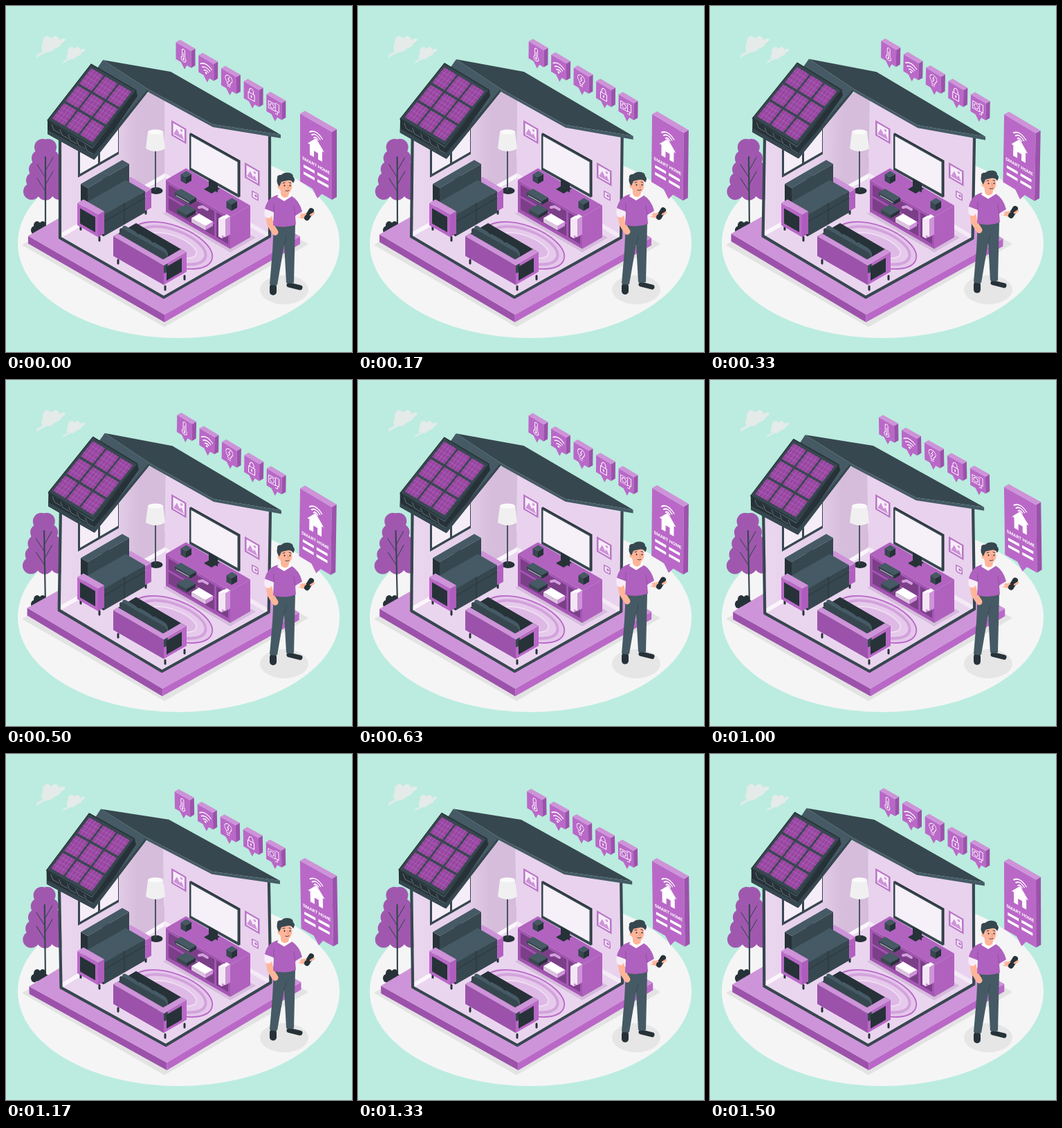
An HTML page that plays this animation: 500x500 px, repeating every 1.54 s.

```html
<!DOCTYPE html>
<html lang="en">
<head>
<meta charset="utf-8">
<title>Smart home</title>
<style>
html, body { margin: 0; width: 100%; height: 100%; overflow: hidden; background: #bbecdf; }
svg { display: block; width: 100vw; height: 100vh; }
text { font: 700 6.2px Roboto, sans-serif; text-anchor: middle; fill: #fff; }
</style>
</head>
<body>
<svg id="stage" viewBox="0 0 500 500"></svg>
<script>
const DARK = '#263238', SLATE = '#37474f', STEEL = '#455a64';
const LIGHT = '#ce93d8', PURPLE = '#ba68c8', DEEP = '#9c52ab', SHADE = '#7b3f88';
const SKIN = '#ffb59a', WHITE = '#fff', ISO = 0.577;

const repeat = (n, fn) => Array.from({ length: n }, (_, i) => fn(i)).join('');
const group = (id, ...parts) => `<g id="${id}">${parts.join('')}</g>`;
const placed = (transform, ...parts) => `<g transform="${transform}">${parts.join('')}</g>`;
const poly = (fill, points) => `<polygon fill="${fill}" points="${points}"/>`;
const path = (fill, d) => `<path fill="${fill}" d="${d}"/>`;
const line = (color, width, d) =>
  `<path fill="none" stroke="${color}" stroke-width="${width}" stroke-linecap="round" stroke-linejoin="round" d="${d}"/>`;
const oval = (fill, x, y, rx, ry = rx, extra = '') =>
  `<ellipse fill="${fill}" cx="${x}" cy="${y}" rx="${rx}" ry="${ry}" ${extra}/>`;
const rect = (fill, x, y, w, h, r = 0) =>
  `<rect fill="${fill}" x="${x}" y="${y}" width="${w}" height="${h}" rx="${r}"/>`;

// Isometric parts: drawing on a wall, one upright face, one flat tile, one block.
const onWall = (x, y, slope, ...parts) => placed(`matrix(1 ${slope} 0 1 ${x} ${y})`, ...parts);
const face = (fill, x, y, w, h, slope = ISO, r = 0) => onWall(x, y, slope, rect(fill, 0, 0, w, h, r));
const tile = (fill, x, y, l, r) => poly(fill,
  [x, y, x - l, y - l * ISO, x - l + r, y - (l + r) * ISO, x + r, y - r * ISO]);
const box = (x, y, l, r, h, top, left, right) =>
  face(left, x - l, y - h - l * ISO, l, h) + face(right, x, y - h, r, h, -ISO) + tile(top, x, y - h, l, r);
const darkBox = (x, y, l, r, h) => box(x, y, l, r, h, STEEL, SLATE, DARK);
const cushion = (x, y, l, r, h) => box(x, y, l, r, h, STEEL, DARK, SLATE);

const cloud = path('#e4ebe9',
  'M43 75L45 70L53 66Q49 61 53 56Q52 47 57 44Q62 42 65 47Q71 41 75 45L77 49Q84 45 86 48Q86 51 80 54Q78 60 71 61Q67 67 58 67Z');
const clouds = cloud + placed('translate(49 26) scale(.76)', cloud);

const ground = oval('#f5f5f5', 249.5, 343, 232.5, 137) +
  tile('#e3e3e3', 229, 464, 206, 208) + oval('#e6e6e6', 402, 410, 35, 21);

const tree = group('tree',
  oval('#a058af', 57, 240, 20, 41),
  repeat(10, i => {
    const row = i >> 1, side = i % 2 ? 1 : -1;
    return oval('#a058af', 57 + side * (4 + row * 4), 204 + row * 16, 12);
  }),
  repeat(4, i => line(SLATE, 1, `M57 ${268 - i * 10}l${i % 2 ? 11 : -12} -19`)),
  line(SLATE, 2.2, 'M57 325V218')) +
  repeat(5, i => oval(DARK, 41 + i * 4, 324 - i % 2 * 7, 5, 6));

const shellBack =
  box(229, 457, 197, 196, 11, '#ce94d9', DEEP, PURPLE) +
  face('url(#wall)', 80, 198, 149, 137, -ISO) +
  poly('#e9d2ee', '229,130 298,171 381,189 381,333 229,247') +
  tile('#ead5ef', 229, 421, 149, 152) +
  face('#faf5fb', 80, 328, 149, 7, -ISO) + face('#f4eaf6', 229, 241, 152, 7);

const CELL = 0.275;
const solarCell = i => {
  const x = 0.05 + i % 3 * 0.31, y = 0.05 + Math.floor(i / 3) * 0.31;
  return rect('#97469f', x, y, CELL, CELL) + repeat(3, k => {
    const d = (k + 1) * CELL / 4;
    return line('#b065be', 0.008, `M${x + d} ${y}v${CELL}M${x} ${y + d}h${CELL}`);
  });
};
const solarPanel = placed('matrix(65 38 -63 81 123 84)',
  rect(SLATE, 0, 0, 1, 1), repeat(9, solarCell), line(DARK, 0.015, 'M0 0H1V1H0Z'));

const shellFront =
  line(SLATE, 4.2, 'M78 190V335L228 421L381 333V188') +
  poly(SLATE, '140,78 238,95 397,186 299,171 205,120') +
  poly(STEEL, '205,120 299,171 397,186 397,191 299,175 205,124') +
  poly(STEEL, '140,78 205,120 205,124 128,222 70,180') +
  poly(DARK, '60,165 125,206 188,122 190,130 127,222 60,185') +
  poly(SLATE, '60,179 126,215 205,120 205,124 127,222 60,185') +
  repeat(5, i => line('#7d8b91', 0.7, `M${66 + i * 12} ${171 + i * 7.5}l3 8l9 5`)) +
  solarPanel;

const windowPanes = face(SLATE, 104, 178, 59, 70, -ISO) +
  repeat(2, i => face('#f5edf7', 107 + i * 29, 179.5 - i * 16.7, 26, 63, -ISO));

const lamp = oval(DARK, 217, 267, 9.5, 5) + line(SLATE, 1.8, 'M216 205V266') +
  path('#f1f0f1', 'M205 182L202 206Q216 214 230 206L227 182Z') + oval('#fafafa', 216, 182, 11, 3.5);

const picture = (x, y) => onWall(x, y, ISO,
  rect('#b877c6', 0, 0, 21.5, 22), rect('#f6edf8', 2.5, 2.5, 16.5, 17),
  poly(LIGHT, '3,18 8,8 12,14 14.5,11 18.5,18'), oval(LIGHT, 14.5, 6.5, 1.7));

const tv = face(DARK, 266.5, 183, 72, 53, 0.56) + face(SLATE, 265, 184, 72, 53, 0.56) +
  face('#f6f0f8', 267.5, 188, 67, 46, 0.56);

const thermostat = onWall(355, 266, ISO,
  rect('#b877c6', 0, 0, 10, 10.5, 2), rect('#f0def3', 1.5, 1.5, 7, 7.5, 1), oval(PURPLE, 6, 5, 1.6));

const ring = (fill, rx, stroke, width) =>
  oval(fill, 240, 346, rx, rx * 0.6 - 8, `stroke="${stroke}" stroke-width="${width}"`);
const rug = placed('rotate(20 240 346)',
  ring('#e4c6ea', 61, PURPLE, 1.8), ring('#e6caeb', 51, '#d3a3dc', 4), ring('#dfb9e6', 37, '#f2e4f5', 1.5));

const cabinet =
  tile('#d6bcdc', 324, 356, 97, 37) +
  box(324, 351, 93, 29, 46, '#b163bf', '#a456b3', '#b061be') +
  onWall(231, 251, ISO, rect(SHADE, 4, 5, 66, 16), rect(SHADE, 4, 24, 66, 17), rect(SHADE, 73, 5, 17, 36)) +
  darkBox(266, 287, 22, 9, 5) + line(WHITE, 0.8, 'M246 274l18 10') +
  line('#d59ede', 4, 'M279 291l5 -1l7 4') +
  darkBox(261, 307, 14, 13, 5) + box(288, 324, 20, 11, 6, WHITE, '#dcc4e1', LIGHT) +
  repeat(2, i => box(312 + i * 5, 336 - i * 2, 5, 7, 26, WHITE, '#f4e6f6', LIGHT)) +
  darkBox(260, 257, 7.5, 8, 9.5) + darkBox(326, 296, 7.5, 8, 9.5) +
  tile(DARK, 297, 271, 11, 12) + face(DARK, 293, 249, 13, 13);

const legs = (...spots) => spots.map(([x, y]) => line(DARK, 3, `M${x} ${y - 6}v5`)).join('');

const backSofa =
  legs([108, 324], [135, 340], [202, 301]) +
  box(202, 296, 30, 8, 27, LIGHT, PURPLE, '#b160bf') +
  tile('#f0e6f2', 196, 279, 12, 6) +
  cushion(149, 274, 10, 29, 29) + cushion(118, 290, 10, 31, 27) +
  cushion(141, 333, 30, 60, 22) +
  cushion(171, 295, 28, 30, 10) + cushion(141, 312, 28, 30, 10) +
  line(DARK, 0.8, 'M141 312l60 -35M171 285v30') +
  box(133, 334, 30, 9, 32, LIGHT, PURPLE, '#ad5dbb') +
  onWall(103, 285, ISO, rect(DARK, 4, 5, 22, 22));

const frontSofa =
  legs([162, 373], [230, 411], [258, 396]) +
  box(228, 403, 73, 33, 28, DARK, DEEP, PURPLE) +
  repeat(3, i => {
    const x = 164 + i * 21, y = 317 + i * 12;
    return face(STEEL, x + 4, y - 2, 24, 32, ISO, 6) + face(SLATE, x, y + 2, 26, 30, ISO, 5) +
      line(DARK, 0.8, `M${x + 26} ${y + 20}v22`);
  }) +
  face(DEEP, 155, 333, 73, 28) + tile(LIGHT, 228, 375, 73, 7) + tile(LIGHT, 228, 375, 8, 33) +
  onWall(228, 375, -ISO, rect(DARK, 4, 4, 22, 20));

const glyphs = [
  line(WHITE, 0.9, 'M-2 3V-7Q0 -10 2 -7V3A3.5 3.5 0 1 1 -2 3M0 -3V5') + oval(WHITE, 0, 6, 1.3),
  line(WHITE, 1.4, 'M-8 -2Q0 -9 8 -2M-5.5 1.500Q0 -3 5.5 1.5M-3 4.5Q0 2 3 4.5') + oval(WHITE, 0, 7, 1.4),
  line(WHITE, 0.9, 'M-2 5Q-2 2 -4 0A5 5 0 1 1 4 0Q2 2 2 5ZM-2 7.5H2M1 -6L-1 -2H1L-1 2'),
  line(WHITE, 1, 'M-4.5 -1H4.5V8H-4.5ZM-3 -1V-5Q0 -11 3 -5V-1M0 3V5') + oval(WHITE, 0, 3, 1.1),
  line(WHITE, 0.9, 'M-8 -5H2V5H-8ZM2 -7H7V4H2M5 4V8H2M-6 0A3 3 0 1 0 0 0A3 3 0 1 0 -6 0')
];
const bubbles = repeat(glyphs.length, i => placed(`translate(${245.5 + i * 32.7} ${50.5 + i * 18.8})`,
  box(22, 39, 22, 6, 24.5, LIGHT, PURPLE, DEEP), poly(PURPLE, '7,30 16,35 12.5,41'),
  onWall(11, 20.5, 0.56, glyphs[i])));

const sign = box(471, 280, 46, 7, 98, LIGHT, PURPLE, DEEP) + poly(PURPLE, '442,262 457,271 450,278') +
  onWall(448, 205, 0.56,
    path(WHITE, 'M0 -14L12 0H9V15H3V6H-3V15H-9V0H-12Z'),
    repeat(3, i => line(WHITE, 1.7, `M${i * 3 - 9} ${i * 2.5 - 18}q${9 - i * 3} ${i * 2.5 - 9} ${18 - i * 6} 0`)),
    '<text y="27.500">SMART HOME</text>',
    repeat(4, i => rect(WHITE, i % 2 * 20 - 18, 34 + (i >> 1) * 10, 16, 4)));

const man = group('man',
  line(DARK, 10, 'M386 406V413'), line(DARK, 7, 'M409 403L425 407'),
  path(STEEL, 'M387 315H418L416 400Q410 402 405 400L402 345L392 403Q387 405 381 402L385 355Z'),
  line(SLATE, 0.8, 'M402 345L405 333'),
  line(SKIN, 9, 'M379 300L382 316L389 327'), line(SKIN, 7, 'M422 302L431 304L442 299'),
  line('#f7edf9', 11, 'M379 296V301M421 298L422 300'),
  path('#ae61be', 'M393 273Q378 276 374 293L387 298L386 317Q402 322 419 316L418 303L428 297Q424 281 412 274Z'),
  line('#8f4a9e', 0.8, 'M387 298V286M418 303L416 290'),
  poly(WHITE, '395,270 392,276 402,282 413,275 410,270'),
  line(SKIN, 12, 'M403 265V271'),
  oval(SKIN, 404, 260, 9.5, 11.5), oval(SKIN, 395, 261, 2.5, 3.2),
  path(SLATE, 'M395 261Q390 255 392 249Q391 244 398 244Q402 240 409 241Q415 242 415 247Q419 250 415 256Q412 251 407 252L398 254Z'),
  line(DARK, 0.9, 'M400 256L403 255.5M409 255L412 256M404 267Q407 268 409 266.5'),
  line('#e58468', 0.8, 'M407 259L408.5 263L406.5 263.5'),
  repeat(2, i => oval(DARK, 402.5 + i * 8, 259.5, 0.9, 1.2)),
  line(DARK, 8, 'M441 296L435 306'), line(SKIN, 2.4, 'M440 302L445 299M426 302L433 301'));

document.getElementById('stage').innerHTML =
  `<linearGradient id="wall"><stop stop-color="#ead6ee"/><stop offset=".5" stop-color="#e6d0eb"/>
    <stop offset=".75" stop-color="#d6bddb"/></linearGradient>` +
  clouds + ground + tree + group('shellBack', shellBack) +
  windowPanes + lamp + picture(239, 165) + picture(345, 226) + thermostat + tv +
  rug + cabinet + backSofa + frontSofa +
  group('shellFront', shellFront) + group('signs', bubbles, sign) + man;

const LOOP = 1540;
const move = (id, transform) => document.getElementById(id).setAttribute('transform', transform);

function draw() {
  const phase = performance.now() % LOOP / LOOP;
  const sway = Math.sin(phase * 2 * Math.PI);
  const lift = Math.sin(phase * Math.PI) ** 2;
  for (const id of ['shellBack', 'shellFront']) move(id, `rotate(${sway} 229 250)`);
  move('signs', `rotate(${sway} 361 163)`);
  move('tree', `rotate(${-1.4 * lift} 57 325)`);
  move('man', `translate(0 ${-8 * lift})`);
  requestAnimationFrame(draw);
}
draw();
</script>
</body>
</html>
```
